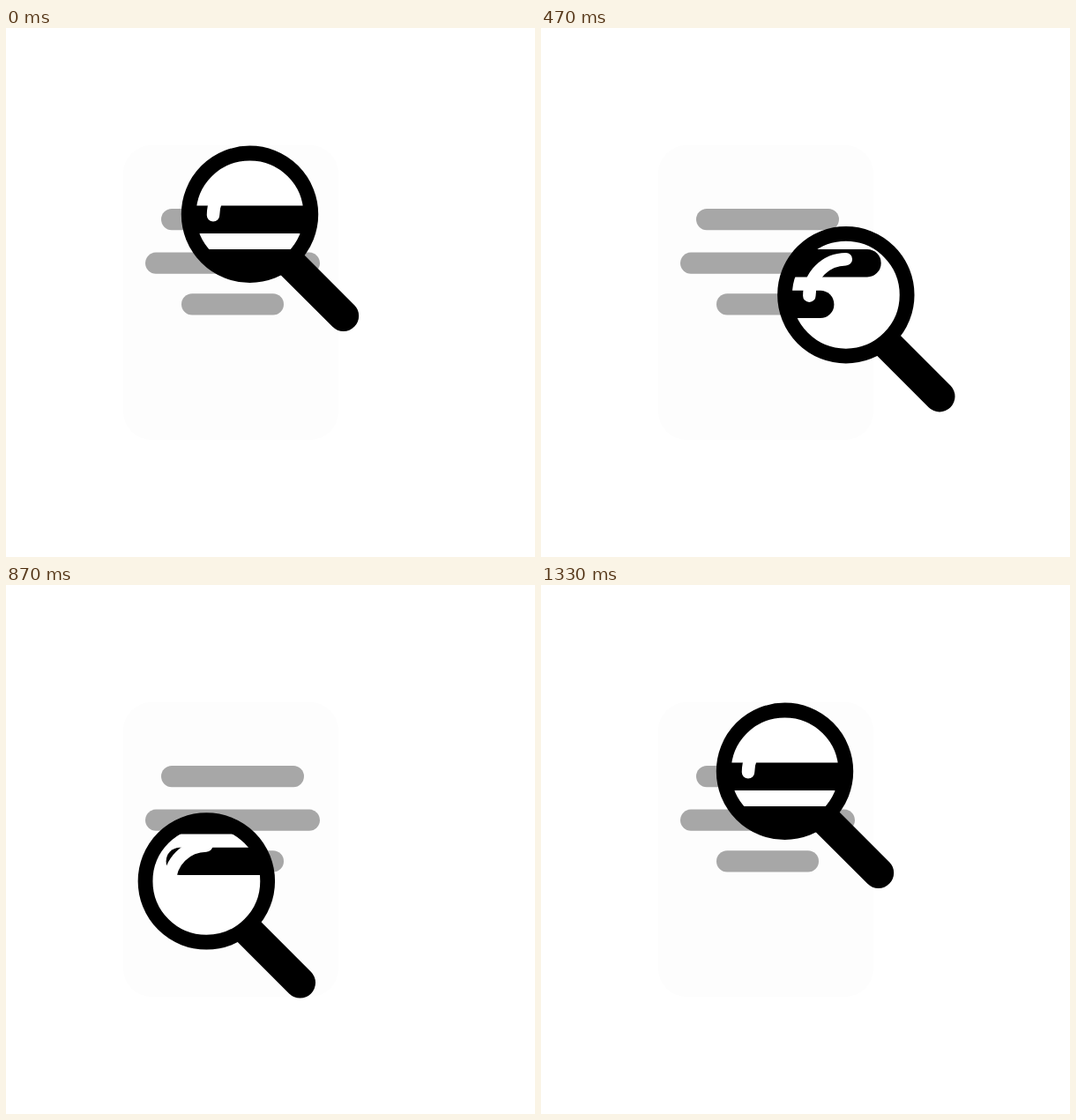
These frames come from a looping animation (600x600 px, 1.36 s). An HTML page:

```html
<!DOCTYPE html>
<html lang="en">
<head>
<meta charset="utf-8">
<title>Searching</title>
<style>
  html, body { margin: 0; width: 100%; height: 100%; overflow: hidden; background: #fff; }
  svg { display: block; width: 100vw; height: 100vh; }
</style>
</head>
<body>
<svg viewBox="0 0 600 600">
  <defs>
    <clipPath id="glass"><circle r="66"/></clipPath>
    <g id="lines">
      <rect x="176" y="205" width="162" height="24.2" rx="12.1"/>
      <rect x="158" y="254.6" width="198" height="24.2" rx="12.1"/>
      <rect x="199" y="301.3" width="116" height="24.2" rx="12.1"/>
    </g>
    <!-- the same lines, each enlarged about its own centre -->
    <g id="zoomed">
      <rect x="151.7" y="201.6" width="210.6" height="31.4" rx="15.7"/>
      <rect x="128.3" y="251" width="257.4" height="31.4" rx="15.7"/>
      <rect x="181.6" y="297.7" width="150.8" height="31.4" rx="15.7"/>
    </g>
  </defs>

  <rect x="133" y="133" width="244" height="334" rx="32" fill="#fdfdfd"/>
  <use href="#lines" fill="#a7a7a7"/>

  <g id="lens">
    <path d="M46 55L106.2 115.2" stroke="#000" stroke-width="35" stroke-linecap="round"/>
    <circle r="69" fill="#fff"/>
    <g clip-path="url(#glass)"><use id="view" href="#zoomed"/></g>
    <path d="M-41.5 1A41.5 41.5 0 0 1 0 -40.5" fill="none" stroke="#fff" stroke-width="14.5" stroke-linecap="round"/>
    <circle r="69.3" fill="none" stroke="#000" stroke-width="16.8"/>
  </g>
</svg>
<script>
  const LOOP = 1360, STEP = 100 / 3, STEPS = 40;
  const CX = 276.5, CY = 283.3, RADIUS = 72;
  const QUARTER = 12.4; // the first quarter turn is slower than the rest

  const lens = document.getElementById('lens');
  const view = document.getElementById('view');

  function turn(step) {
    return step < QUARTER
      ? 0.25 * step / QUARTER
      : 0.25 + 0.75 * (step - QUARTER) / (STEPS - QUARTER);
  }

  function draw(now) {
    // 30 steps a second, on a 10 ms clock
    const tick = Math.floor((now % LOOP) / 10 + 0.001) * 10;
    const step = Math.min(STEPS, Math.floor((tick + 3.4) / STEP));
    const angle = turn(step) * 2 * Math.PI;
    const x = CX + RADIUS * Math.sin(angle);
    const y = CY - RADIUS * Math.cos(angle);
    lens.setAttribute('transform', `translate(${x} ${y})`);
    view.setAttribute('transform', `translate(${-x} ${-y})`);
  }

  function loop(now) {
    draw(now);
    requestAnimationFrame(loop);
  }

  draw(0);
  requestAnimationFrame(loop);
</script>
</body>
</html>
```
